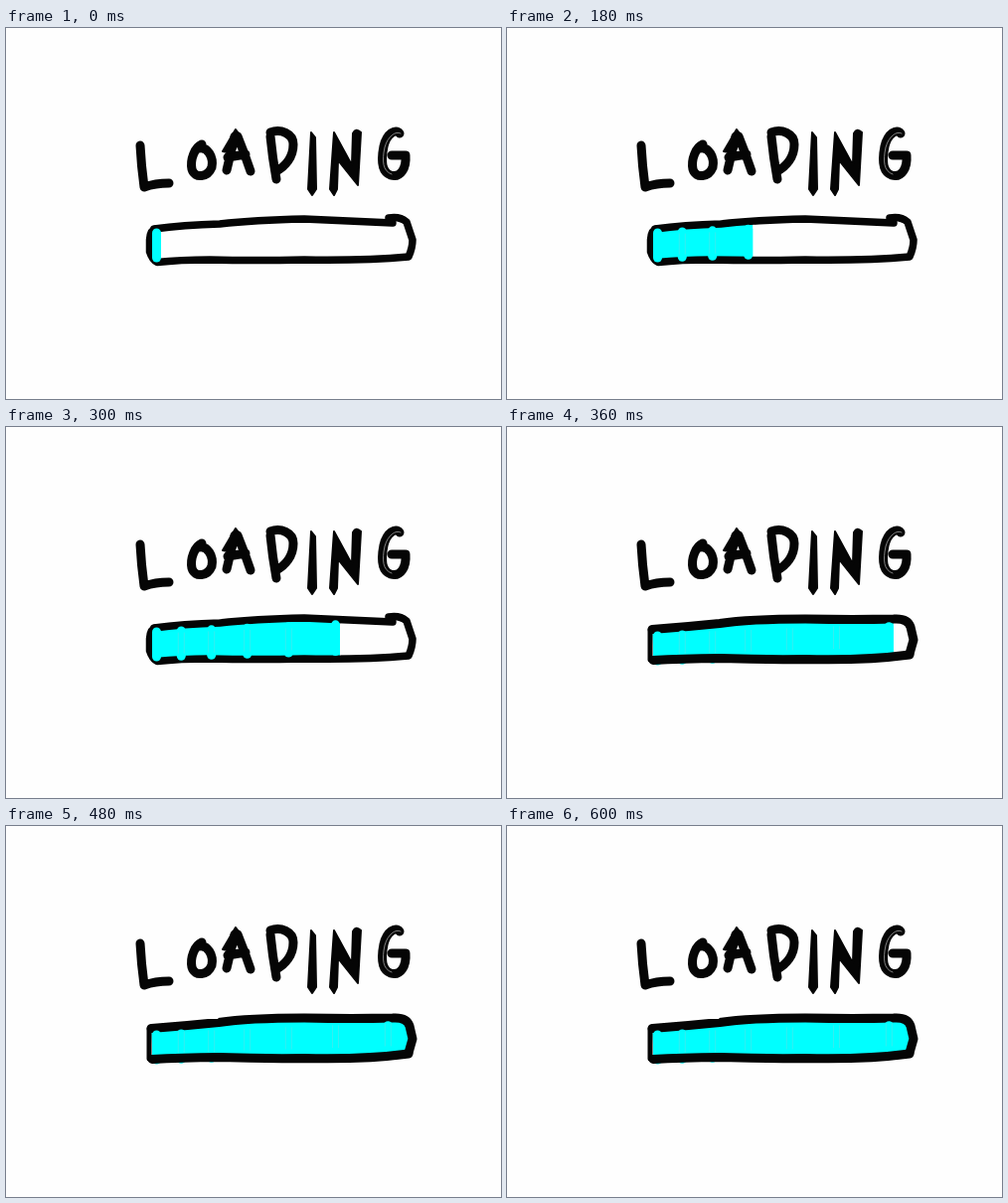
Write an HTML page that moves like this. It is 498 px wide and 373 px high and loops after 0.66 s.

```html
<!DOCTYPE html>
<html lang="en">
<head>
<meta charset="utf-8">
<title>Loading</title>
<style>
  html, body { margin: 0; width: 100%; height: 100%; overflow: hidden; background: #fefefe; }
  svg { display: block; width: 100vw; height: 100vh; }
  path { stroke-linecap: round; stroke-linejoin: round; }
  .ink { fill: none; stroke: #050505; stroke-width: 9; }
  .solid { fill: #050505; stroke: #050505; stroke-width: 2; }
  .dab { stroke: #00ffff; stroke-width: 9; }
  .seam { stroke: #58e4e8; stroke-width: 1; opacity: .6; }
</style>
</head>
<body>
<svg viewBox="0 0 498 373" role="img" aria-label="Loading">
  <defs><clipPath id="progress"><rect id="limit" x="140" y="180" height="70"/></clipPath></defs>

  <g id="letters">
    <path class="ink" d="M135 118 Q136 138 139 160 Q150 156 164 156"/>
    <path class="ink" d="M197 117 C190 120 185 132 187 142 C190 152 203 150 207 140 C209 130 203 119 194 121"/>
    <path class="ink" d="M230 109 L222 143 M233 109 Q240 126 246 144 M223 130 L241 127"/>
    <path class="solid" d="M231 102 L237 110 L228 126 L218 124 Z"/>
    <path class="ink" d="M266 109 Q268 130 272 152 M266 105 C276 101 289 106 289 117 C289 130 281 139 272 144"/>
    <path class="solid" d="M307 105 L311 110 L312 162 L308 168 L304 162 Z"/>
    <path class="solid" d="M330 105 L348 138 L349 106 Q352 100 357 105 L354 158 L334 133 L333 162 L330 168 L326 162 Z"/>
    <path class="ink" d="M396 106 C392 101 383 106 380 119 C377 134 378 145 387 148 C397 151 403 141 402 128 L388 128"/>
    <path fill="none" stroke="#a0a0a0" stroke-width=".8" d="M397 106 C392 103 384 109 381 120 C378 134 379 144 388 147"/>
  </g>

  <path clip-path="url(#progress)" fill="#00ffff" d="M146 204 Q220 195 300 193 L400 195 L409 212 L405 229 L300 233 L148 235 Z"/>
  <g id="outline" class="ink" style="stroke-width: 7.5">
    <path d="M151 202 Q145 203 144.500 213 L144.500 225 Q147 233 152 235.500 Q175 233 205 233 Q250 234 300 233 Q360 234 405 230 Q409 221 409 213 L403 195 Q396 189 385 191"/>
    <path d="M149 202 Q178 198 215 197 Q250 193 300 192 Q343 194 389 196"/>
  </g>
  <path id="lid" class="ink" d="M146 203.500 Q180 201 214 197.500 Q244 193 300 193 Q350 194 389 193 Q403 192 406 201 L409 214 L405 228"/>
  <g id="dabs"></g>
  <g id="seams"></g>
  <g id="base" class="ink">
    <path style="stroke-width: 5" d="M144 204 V234"/>
    <path d="M147 234.500 Q175 233 215 232.500 Q255 234 300 233.500 Q360 235 405 229"/>
  </g>
</svg>
<script>
const STEP = 60, COUNT = 11, FULL = 6;
const byId = id => document.getElementById(id);
const show = (node, on) => node.setAttribute("visibility", on ? "visible" : "hidden");

// The fill speeds up until it reaches the right wall.
const fillEnd = step => Math.min(410, 156 + 22 * step + 2.8 * step * step);

function addPath(parent, className, d) {
  const path = document.createElementNS("http://www.w3.org/2000/svg", "path");
  path.setAttribute("class", className);
  path.setAttribute("d", d);
  byId(parent).append(path);
  return path;
}

// Each step leaves one vertical brush dab with a faint seam on both sides.
const marks = Array.from({ length: FULL + 1 }, (_, step) => {
  const x = fillEnd(step) - 4.5;
  const top = 206 - (x - 152) * .04;
  const bottom = 231 - (x - 152) * .03;
  return [
    addPath("dabs", "dab", `M${x} ${top} V${bottom}`),
    addPath("seams", "seam", `M${x - 3} ${top + 2} V${bottom - 3} M${x + 3} ${top + 2} V${bottom - 3}`)
  ];
});

function draw(time) {
  const step = Math.floor(time / STEP) % COUNT;
  const full = step >= FULL;
  byId("limit").setAttribute("width", fillEnd(step) - 140);
  show(byId("outline"), !full);
  show(byId("lid"), full);
  show(byId("base"), full);
  byId("dabs").setAttribute("transform", `translate(0 ${full ? 4 : 0})`);
  marks.forEach(([dab, seam], i) => {
    show(dab, i <= step);
    show(seam, i > 0 && i < step);
  });
}

const start = performance.now();
function tick() {
  draw(performance.now() - start);
  requestAnimationFrame(tick);
}
tick();
</script>
</body>
</html>
```
